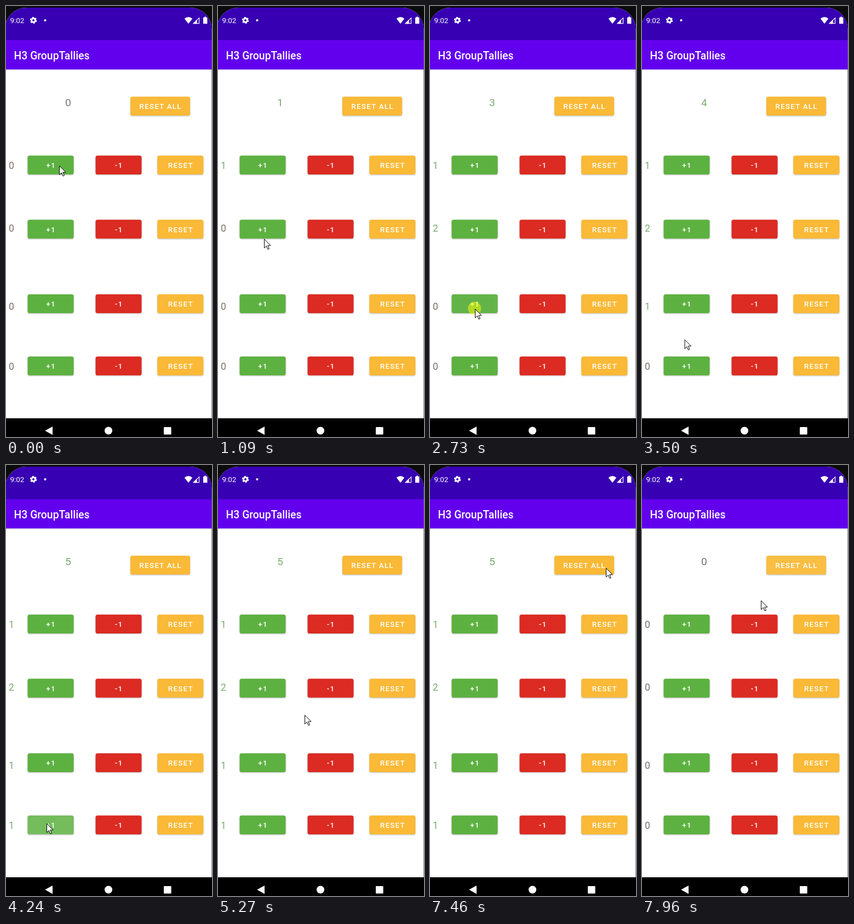
Animation of 376x783 px, one loop 8 s. Source, as an HTML page:

```html
<!DOCTYPE html>
<html lang="en">
<head>
<meta charset="utf-8">
<title>Counter demo</title>
<style>
html, body { margin: 0; width: 100%; height: 100%; overflow: hidden; background: #0b0b0b; }
svg { display: block; width: 100vw; height: 100vh; }
text { font-family: Roboto, "Open Sans", sans-serif; fill: #fff; }
.title { font-size: 19.4px; font-weight: 500; }
.clock { font-size: 13.4px; }
.label { font-size: 13.5px; font-weight: 500; letter-spacing: 1.2px; text-anchor: middle; }
.count { font-size: 17.6px; text-anchor: middle; }
.count.total { font-size: 19.2px; }
.btn { filter: drop-shadow(0 1.5px 1.3px rgba(0, 0, 0, .28)); }
</style>
</head>
<body>
<svg viewBox="0 0 376 783" preserveAspectRatio="none">
  <defs>
    <clipPath id="screen"><rect x="-2" y="3" width="377.5" height="840" rx="39"/></clipPath>
  </defs>
  <g clip-path="url(#screen)">
    <rect width="376" height="783" fill="#fff"/>
    <rect width="376" height="62" fill="#3700b3"/>
    <rect y="62" width="376" height="53.3" fill="#6200ee"/>
    <rect y="115.3" width="376" height="1" opacity=".12"/>
  </g>
  <rect y="749" width="376" height="34"/>

  <text class="clock" x="7.5" y="31">9:02</text>
  <g fill="#fff">
    <g fill="none" stroke="#fff">
      <circle cx="50" cy="26" r="3.5" stroke-width="3"/>
      <circle cx="50" cy="26" r="5.3" stroke-width="2" stroke-dasharray="2.8 2.75"/>
      <path d="M342.5 31.6L352.5 21.6V31.6Z" stroke-width="1.2"/>
    </g>
    <circle cx="71.5" cy="26" r="2.1"/>
    <path d="M333 32.2L325.8 23Q333 17.2 340.2 23Z"/>
    <path d="M341 32.2L348.6 24.6V32.2Z"/>
    <path d="M360 21h2v-1.6h3.4V21h2v11.3h-7.4z"/>
    <path d="M71.3 771.5L85 764V779.3Z"/>
    <circle cx="187" cy="771.5" r="7"/>
    <rect x="288" y="765" width="13.6" height="13.6" rx="1"/>
  </g>
  <text class="title" x="14.5" y="97">H3 GroupTallies</text>

  <g id="ui"></g>
  <circle id="spot" r="12" fill="#ff0" opacity=".5"/>
  <path id="arrow" d="M.5 .5V16.6L4.3 13L7 19L9.4 18L6.8 12.1H12Z"
        fill="#fff" stroke="#000" stroke-linejoin="round"/>
</svg>
<script>
const LOOP = 8000, STEP = 68, HOLD = 110, RESET = -1;
const GREEN = '#5db141', RED = '#db2b22', AMBER = '#fab936';
const NS = 'http://www.w3.org/2000/svg';
const byId = id => document.getElementById(id);
const ui = byId('ui'), spot = byId('spot'), arrow = byId('arrow');

function add(tag, attrs, text = '') {
  const el = document.createElementNS(NS, tag);
  for (const k in attrs) el.setAttribute(k, attrs[k]);
  el.textContent = text;
  return ui.appendChild(el);
}

// Returns the white overlay used for the press ripple.
function button(x, y, fill, label, width = 84) {
  const box = { x, y, width, height: 34.3, rx: 3.6 };
  add('rect', { ...box, fill, class: 'btn' });
  add('text', { x: x + width / 2 + .6, y: y + 22.3, class: 'label' }, label);
  return add('rect', { ...box, fill: '#fff', opacity: 0 });
}

function counterRow(y, base) {
  const num = add('text', { x: 10, y: base, class: 'count' });
  const plus = button(39.5, y, GREEN, '+1');
  button(163.5, y, RED, '-1');
  button(276.3, y, AMBER, 'RESET');
  return { num, plus };
}

const total = add('text', { x: 113.3, y: 182, class: 'count total' });
const resetAll = button(227, 164.7, AMBER, 'RESET ALL', 109);
const rows = [
  counterRow(271.7, 296), counterRow(388.2, 410),
  counterRow(523.8, 552), counterRow(636.7, 661)
];

// Storyboard: glides end at a given time, clicks start at one.
const glides = [], clicks = [];
const glide = (x, y, end, ms) => glides.push({ x, y, end, ms });
const click = (row, ...times) => times.forEach(at => clicks.push({ row, at }));

glide(88, 290, 136, 136);
click(0, 540);
glide(84, 423, 1088, 300);
glide(83, 411, 1290, 100);
click(1, 1420, 1690);
glide(86, 456, 2176, 280);
glide(82, 550, 2652, 420);
click(2, 2680);
glide(74, 651, 3808, 760);
click(3, 3960);
glide(158, 454, 4964, 480);
glide(211, 333, 6460, 760);
glide(208, 297, 6664, 160);
glide(321, 187, 7310, 550);
click(RESET, 7600);
glide(272, 201, 7820, 120);
glide(217, 246, 7956, 136);

const clamp = v => Math.max(0, Math.min(1, v));

function tipAt(t) {
  let x = 97, y = 290;
  for (const g of glides) {
    const k = clamp((t - g.end) / g.ms + 1);
    x += (g.x - x) * k;
    y += (g.y - y) * k;
  }
  return [x, y];
}

// Fades in on press and out shortly after release.
const ripple = age => .14 * clamp(age / 150) * clamp((HOLD + 320 - age) / 160);

function show(el, n, wasReset) {
  el.textContent = n;
  el.style.fill = n ? '#7aab6e' : wasReset ? '#757575' : '#7f746c';
}

function draw(now) {
  const t = Math.floor((now % LOOP) / STEP) * STEP;
  const counts = rows.map(() => 0), glow = rows.map(() => 0);
  let glowAll = 0, wasReset = false, down = false;

  for (const { row, at } of clicks) {
    const age = t - at;
    const done = age >= HOLD;
    down ||= age >= 0 && !done;
    if (row === RESET) {
      glowAll = ripple(age);
      wasReset = done;
      if (done) counts.fill(0);
    } else {
      glow[row] = Math.max(glow[row], ripple(age));
      counts[row] += done;
    }
  }

  rows.forEach((r, i) => {
    show(r.num, counts[i], wasReset);
    r.plus.setAttribute('opacity', glow[i]);
  });
  show(total, counts.reduce((a, b) => a + b), wasReset);
  resetAll.setAttribute('opacity', glowAll);

  const [x, y] = tipAt(t);
  arrow.setAttribute('transform', `translate(${x} ${y})`);
  spot.setAttribute('transform', `translate(${x - .7} ${y - .5})`);
  spot.style.display = down ? '' : 'none';
}

let start;
function tick(now) {
  start ??= now;
  draw(now - start);
  requestAnimationFrame(tick);
}
draw(0);
requestAnimationFrame(tick);
</script>
</body>
</html>
```
